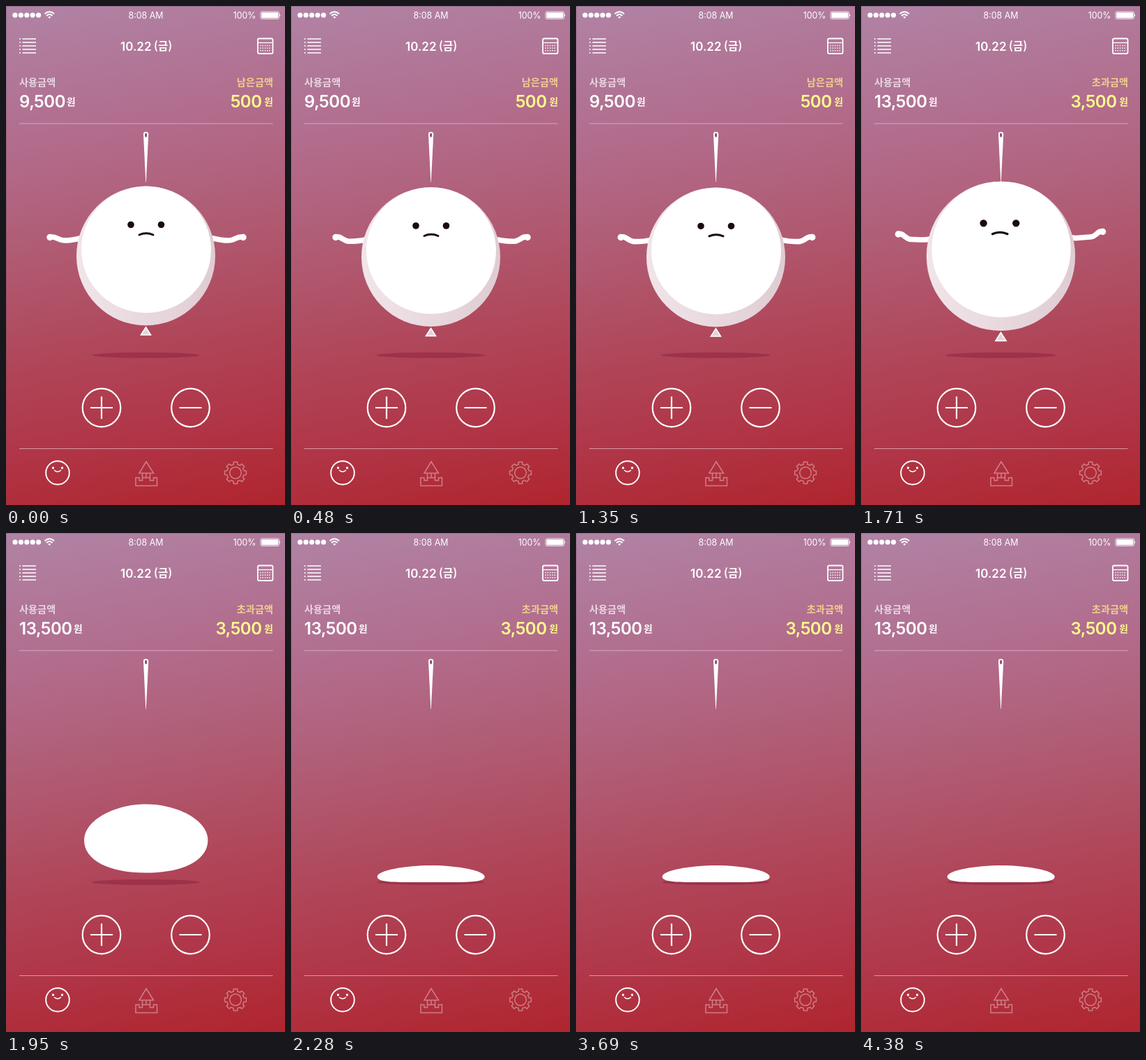
An HTML page that plays this animation: 400 px wide and 713 px high, repeating every 4.41 s.

```html
<!DOCTYPE html>
<html lang="ko">
<head>
<meta charset="utf-8">
<title>Balloon budget</title>
<style>
html, body { margin: 0; width: 100%; height: 100%; overflow: hidden; background: #b05a72; }
svg { display: block; width: 100vw; height: 100vh; }
text { font-family: Inter, "Noto Sans CJK KR", "Noto Sans CJK", sans-serif; fill: #fff; }
.ko { font-family: "Noto Sans CJK KR", "Noto Sans CJK", sans-serif; font-weight: 700; }
.status { font-size: 12.4px; }
.title { font-size: 17px; font-weight: 600; }
.label { font-size: 14.2px; }
.sum { font-size: 24px; font-weight: 600; letter-spacing: -.5px; }
.won { font-size: 13.8px; }
.end { text-anchor: end; }
.line { fill: none; stroke: #fff; }
.dim { opacity: .38; }
.yellow text { fill: #fdfa8c; }
.yellow .label { fill: #efd08c; }
</style>
</head>
<body>
<svg viewBox="0 0 400 713" preserveAspectRatio="none">
  <defs>
    <linearGradient id="sky" gradientUnits="userSpaceOnUse" x1="0" y1="0" x2="129" y2="759">
      <stop offset="0" stop-color="#b083a5"/>
      <stop offset=".27" stop-color="#b26b8b"/>
      <stop offset=".46" stop-color="#b05b73"/>
      <stop offset=".66" stop-color="#b04659"/>
      <stop offset=".82" stop-color="#b03648"/>
      <stop offset="1" stop-color="#b0252e"/>
    </linearGradient>
    <linearGradient id="shade">
      <stop offset="0" stop-color="#f1e5e9"/>
      <stop offset="1" stop-color="#dfccd3"/>
    </linearGradient>
  </defs>
  <rect width="400" height="713" fill="url(#sky)"/>
  <path d="M.5 0V713M0 .5H400" stroke="#5a4a60" stroke-opacity=".3"/>

  <g id="dots" fill="#fff"></g>
  <g class="line" stroke-width="1.9">
    <path d="M55.5 11.3Q62.3 5.200 69.100 11.300M58 14Q62.300 10.200 66.600 14"/>
    <path d="M60.200 15.800Q62.300 14 64.400 15.800L62.300 18Z" fill="#fff" stroke="none"/>
  </g>
  <text class="status" x="200.500" y="18" text-anchor="middle">8:08 AM</text>
  <text class="status end" x="358.500" y="18">100%</text>
  <rect class="line" x="365" y="8" width="26.500" height="10.500" rx="2" stroke-width=".8"/>
  <rect x="366.300" y="9.300" width="24" height="8" rx="1" fill="#fff"/>
  <path d="M392.300 11.300q2 2 0 4z" fill="#fff"/>

  <path id="list" class="line" stroke-width="1.700"/>
  <text class="title" x="164" y="63.500">10.22</text>
  <text class="ko" x="212" y="63" font-size="15.600">(금)</text>
  <rect class="line" x="361" y="46.500" width="21.500" height="21.500" rx="2" stroke-width="1.800"/>
  <path class="line" d="M361 52.500H382.500" stroke-width="1.300"/>
  <g id="days" fill="#fff"></g>

  <text class="ko label" x="19" y="114" fill-opacity=".7">사용금액</text>
  <text class="sum" id="spent" x="19" y="145"></text>
  <text class="ko won" id="won" y="142">원</text>
  <g class="yellow">
    <text class="ko label end" id="kind" x="383" y="114"></text>
    <text class="sum end" id="left" x="366.500" y="145"></text>
    <text class="ko won end" x="383" y="142">원</text>
  </g>
  <path class="line" d="M19 168H382.500" stroke-opacity=".42"/>

  <ellipse id="shadow" cx="200.500" cy="499" ry="4" fill="#8f2440" fill-opacity=".55"/>
  <g id="balloon">
    <g id="arms" fill="#fff"></g>
    <g id="body">
      <path d="M0 102L7 113H-7Z" fill="#e5d2d9" stroke="#fff" stroke-width="1.600"/>
      <circle r="99.500" fill="url(#shade)"/>
      <ellipse cx=".5" cy="-9" rx="93" ry="90.500" fill="#fff"/>
      <g id="face">
        <circle cx="-21.500" cy="-44.500" r="4.800" fill="#190b0f"/>
        <circle cx="22" cy="-44.500" r="4.800" fill="#190b0f"/>
        <path d="M-9.500 -30Q.5 -34.500 10.500 -30" fill="none" stroke="#190b0f" stroke-width="3" stroke-linecap="round"/>
      </g>
    </g>
  </g>
  <path id="skin" fill="#fff"/>
  <path d="M197 183Q197 179.800 200.500 179.800T204.300 183L200.800 251.500H200.300Z" fill="#fff"/>
  <ellipse cx="200.600" cy="184.500" rx="1.500" ry="3" fill="#8c4a66"/>

  <g class="line" stroke-width="2.200">
    <circle cx="137" cy="574" r="27.300"/>
    <circle cx="264.500" cy="574" r="27.300"/>
    <path d="M121 574H153M137 558V590M248.500 574H280.500"/>
  </g>

  <path class="line" d="M19 632.500H382.500" stroke-opacity=".5"/>
  <g class="line" stroke-width="1.900">
    <circle cx="74" cy="667" r="16.800"/>
    <path d="M69.500 663.500Q74 667.500 78.500 663.500" stroke-width="1.500" stroke-linecap="round"/>
    <path d="M67.500 660h.01M80.500 660h.01" stroke-width="3.300" stroke-linecap="round"/>
  </g>
  <g class="line dim" stroke-width="1.500">
    <path d="M201 651L191 667.500H211.500ZM195.500 667.500V674M201 667.500V674M206.500 667.500V674"/>
    <path d="M186 685.500V674H191V678H195.500V674H206.500V678H211.500V674H216.500V685.500Z"/>
    <path id="gear"/>
    <circle cx="329" cy="667" r="8.300"/>
  </g>
</svg>
<script>
const LOOP = 4410, BOB = 1920, SPEND = 1500, FULL = 1710, POP = 1740, LAND = 2010;
const $ = id => document.getElementById(id);
const clamp = v => Math.max(0, Math.min(1, v));
const mix = (a, b, p) => a.map((v, i) => v + (b[i] - v) * p);
const set = (el, attrs) => { for (const k in attrs) el.setAttribute(k, attrs[k]); };
const add = (parent, tag, attrs) => {
  const el = document.createElementNS("http://www.w3.org/2000/svg", tag);
  set(el, attrs);
  return parent.appendChild(el);
};

for (let i = 0; i < 5; i++) add($("dots"), "circle", { cx: 13 + i * 8.4, cy: 13, r: 3.6 });
for (let i = 0; i < 15; i++)
  add($("days"), "rect", { x: 364.2 + i % 5 * 3.3, y: 55.8 + (i / 5 | 0) * 3.6, width: 1.5, height: 1.5 });
set($("list"), { d: [47, 52, 57, 62, 67].map(y => `M19 ${y}h2M23.500 ${y}H43`).join("") });

// Eight teeth, four corners each
const gear = [];
for (let i = 0; i < 32; i++) {
  const tooth = i >> 2, part = i & 3;
  const a = tooth * Math.PI / 4 + [-.24, -.17, .17, .24][part];
  const r = part === 1 || part === 2 ? 15.6 : 12.4;
  gear.push(`${(329 + r * Math.cos(a)).toFixed(2)} ${(667 + r * Math.sin(a)).toFixed(2)}`);
}
set($("gear"), { d: `M${gear.join("L")}Z`, "stroke-linejoin": "round" });

// Arm poses: hand, bend, shoulder
const arms = [
  { dir: 1, high: [63, 330.5, 84, 335, 106, 332], low: [65, 330.5, 84, 337.5, 106, 336], full: [53.5, 326, 72, 333.5, 99, 333] },
  { dir: -1, high: [340, 330.5, 319, 335, 297, 332], low: [338, 330.5, 319, 337.5, 297, 336], full: [346.5, 322.5, 329, 330, 302, 331] }
];
for (const arm of arms) {
  arm.line = add($("arms"), "path", { fill: "none", stroke: "#fff", "stroke-width": 7.6, "stroke-linecap": "round" });
  arm.hand = add($("arms"), "circle", { r: 4.7 });
}

function drawArm(arm, bob, grow) {
  const [hx, hy, bx, by, sx, sy] = mix(mix(arm.high, arm.low, bob), arm.full, grow);
  const d = arm.dir;
  set(arm.line, { d: `M${hx} ${hy}C${hx + 7 * d} ${hy - 3} ${bx - 9 * d} ${by} ${bx} ${by}S${sx - 8 * d} ${sy + 2} ${sx} ${sy}` });
  set(arm.hand, { cx: hx, cy: hy });
}

// Half width, top, middle, bottom, then handle lengths and heights
const round = [107, 250.3, 357.3, 464.3, 59, 298, 416, 59];
const flat = [77, 475, 491, 499, 36, 482, 500, 50];

function skinPath(p) {
  const [w, top, mid, low, kt, up, down, kb] = mix(round, flat, p);
  const c = 200.7, l = c - w, r = c + w;
  return `M${l} ${mid}C${l} ${up} ${c - kt} ${top} ${c} ${top}S${r} ${up} ${r} ${mid}` +
    `C${r} ${down} ${c + kb} ${low} ${c} ${low}S${l} ${down} ${l} ${mid}Z`;
}

function draw(t) {
  const over = t >= SPEND, popped = t >= POP;
  $("spent").textContent = over ? "13,500" : "9,500";
  $("left").textContent = over ? "3,500" : "500";
  $("kind").textContent = over ? "초과금액" : "남은금액";
  set($("won"), { x: over ? 97 : 87 });

  const bob = (1 - Math.cos(2 * Math.PI * t / BOB)) / 2;
  const grow = 1 - (1 - clamp((t - SPEND) / (FULL - SPEND))) ** 2;
  const fall = clamp((t - POP) / (LAND - POP)) ** 2;

  $("balloon").style.display = popped ? "none" : "";
  $("skin").style.display = popped ? "" : "none";
  set($("shadow"), { rx: popped ? 79 - 2 * fall : 77 + 2 * Math.max(bob, grow) });
  if (popped) {
    set($("skin"), { d: skinPath(fall) });
  } else {
    set($("body"), { transform: `translate(200.5 ${357 + 3 * bob}) scale(${1 + .072 * grow})` });
    set($("face"), { transform: `translate(${-1.7 * grow} ${.6 * grow})` });
    for (const arm of arms) drawArm(arm, bob, grow);
  }
}

function tick() {
  draw(performance.now() % LOOP);
  requestAnimationFrame(tick);
}
tick();
</script>
</body>
</html>
```
